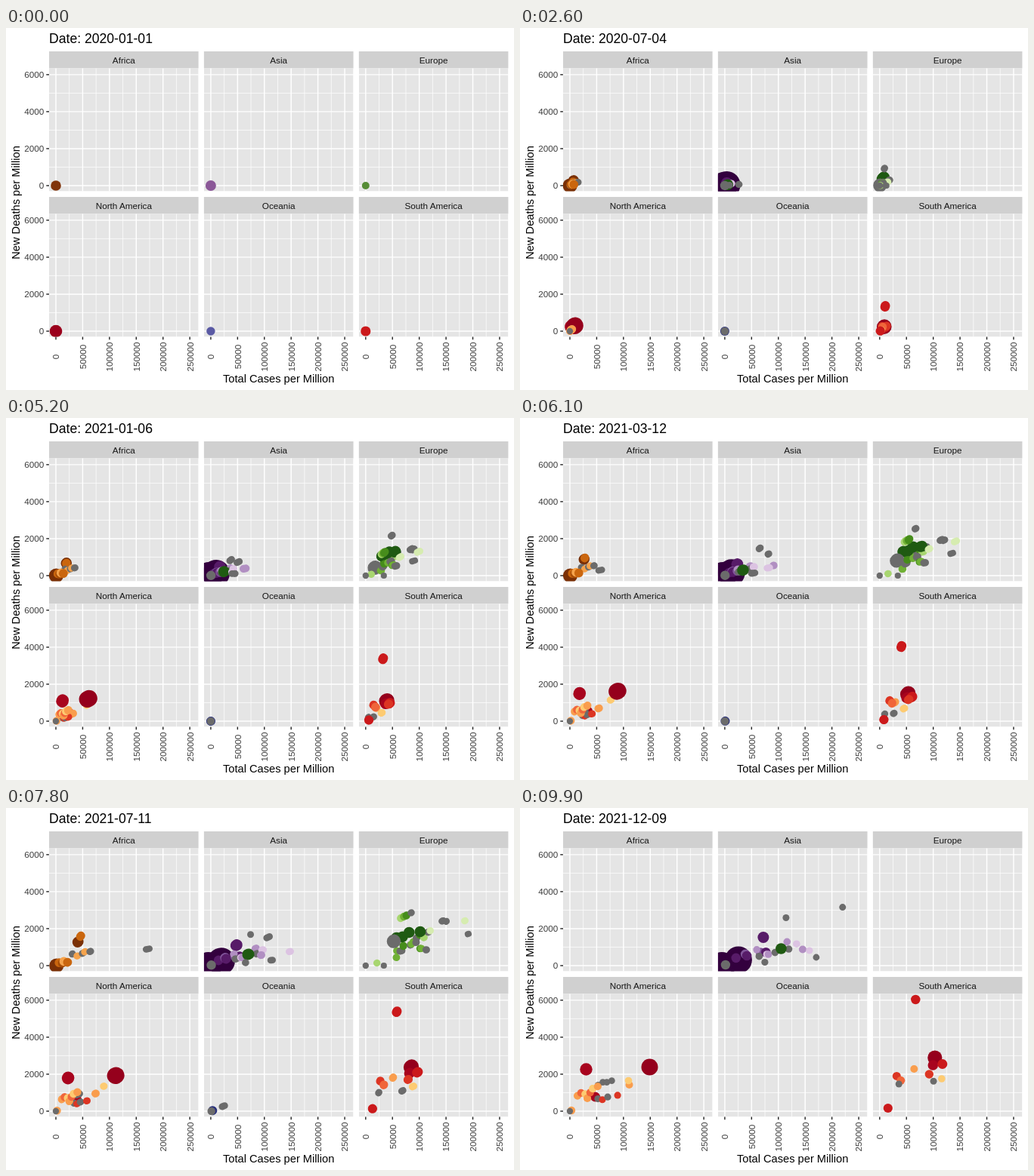
An HTML page for the animation above (10 s loop, 672 by 480 pixels).

```html
<!DOCTYPE html>
<html lang="en">
<head>
<meta charset="utf-8">
<title>Cases and deaths by continent</title>
<style>
html, body { margin: 0; width: 100%; height: 100%; overflow: hidden; background: #fff; }
svg { display: block; }
text { font: 11.73px "Liberation Sans", Arial, sans-serif; fill: #3d3d3d; }
.mid { text-anchor: middle; }
.end { text-anchor: end; }
.strip { fill: #161616; text-anchor: middle; }
.axis { font-size: 14.67px; fill: #000; text-anchor: middle; }
#date { font-size: 17.6px; fill: #000; }
.dot { stroke-linecap: round; fill: none; }
</style>
</head>
<body>
<svg id="stage" width="672" height="480">
  <text id="date" x="57" y="20"></text>
  <text class="axis" x="360.7" y="470">Total Cases per Million</text>
  <text class="axis" transform="translate(18 231.5) rotate(-90)">New Deaths per Million</text>
</svg>
<script>
const stage = document.getElementById('stage'), dateText = document.getElementById('date');
const W = 197.6, H = 163, XSTEP = 35.43, YSTEP = 49.05;
const KEYS = [0, 26, 43, 61, 70, 86, 99], LAST = 99;
const GREY = '#6b6b6b';
const panels = [];

function el(parent, tag, attrs, text) {
  const node = document.createElementNS('http://www.w3.org/2000/svg', tag);
  for (const key in attrs) node.setAttribute(key, attrs[key]);
  if (text !== undefined) node.textContent = text;
  return parent.appendChild(node);
}
const line = (parent, d, width, stroke) => el(parent, 'path', { d, stroke, 'stroke-width': width });

let seed = 7;
function random() {
  seed = (seed * 16807) % 2147483647;
  return seed / 2147483647;
}

// Growth from 0 to 1: a smooth wave between two ticks, two waves in a row, or a curve through KEYS.
const wave = (from, to) => k => {
  const u = Math.min(1, Math.max(0, (k - from) / (to - from)));
  return u * u * (3 - 2 * u);
};
const twoWaves = (share, a, b, c, d) => k => share * wave(a, b)(k) + (1 - share) * wave(c, d)(k);
const through = (...shares) => k => {
  let i = 1;
  while (k > KEYS[i] && i < shares.length - 1) i++;
  return shares[i - 1] + (shares[i] - shares[i - 1]) * (k - KEYS[i - 1]) / (KEYS[i] - KEYS[i - 1]);
};

// Each plot has its data origin at 0,0, with y upwards negated.
function panel(name, color, r, start, leaves, grow) {
  const col = panels.length % 3, row = Math.floor(panels.length / 3);
  const x = 57 + 204.9 * col, y = 53.5 + 193 * row;
  el(stage, 'rect', { x, y: y - 22.5, width: W, height: 22.5, fill: '#d0d0d0' });
  el(stage, 'text', { class: 'strip', x: x + W / 2, y: y - 6.5 }, name);
  const plot = el(stage, 'svg', { x, y, width: W, height: H, viewBox: `-9 -155.5 ${W} ${H}` });
  el(plot, 'rect', { x: -9, y: -155.5, width: W, height: H, fill: '#e5e5e5' });
  for (const [shift, width] of [[.5, .71], [0, 1.42]]) {
    for (let i = 0; i < 6; i++) line(plot, `M${(i + shift) * XSTEP} -156V8`, width, '#fff');
    for (let i = 0; i < 4; i++) line(plot, `M-9 ${-(i + shift) * YSTEP}H190`, width, '#fff');
  }
  if (!col) for (let i = 0; i < 4; i++) {
    const ty = y + 155.5 - i * YSTEP;
    line(stage, `M53.3 ${ty}H57`, 1.42, '#262626');
    el(stage, 'text', { class: 'end', x: 50.4, y: ty + 4.2 }, i * 2000);
  }
  if (row) for (let i = 0; i < 6; i++) {
    const tx = x + 9 + i * XSTEP;
    line(stage, `M${tx} 409.5V413.2`, 1.42, '#262626');
    el(stage, 'text', { class: 'mid', transform: `translate(${tx + 4.4} 436) rotate(-90)` }, i * 50000);
  }
  const p = { plot, start, leaves, grow, first: el(plot, 'circle', { r, fill: color }), dots: [] };
  panels.push(p);
  return p;
}

// A dot ends at x,y. Its pace is a growth function, or a power of the panel's own growth.
function dot(p, color, r, x, y, paceX = 1, paceY = paceX) {
  const share = (pace, k) => typeof pace === 'function' ? pace(k) : p.grow(k) ** pace;
  const at = k => `${(x * share(paceX, k)).toFixed(2)} ${(-y * share(paceY, k)).toFixed(2)}`;
  p.dots.push({ at, node: el(p.plot, 'path', { class: 'dot', stroke: color, 'stroke-width': 2 * r }) });
}

// n dots scattered along the diagonal of a box, cycling through the colours.
function crowd(p, n, colors, r, [x0, x1], [y0, y1], paceX, paceY) {
  for (let i = 0; i < n; i++) {
    const u = (i + random()) / n, v = (u + random()) / 2;
    dot(p, colors[i % colors.length], r, x0 + (x1 - x0) * u, y0 + (y1 - y0) * v, paceX, paceY);
  }
}

const [B0, B1, B2, B3] = ['#7a3006', '#a64c06', '#ca660e', '#f5a34c'];
const africa = panel('Africa', '#80340b', 6.8, 9, true, through(0, .12, .22, .47, .56, .9, 1));
dot(africa, B0, 9.5, 1, 0);
dot(africa, B0, 7, 40, 41, 1, .85);
dot(africa, GREY, 4.3, 166, 30, wave(45, 95));
dot(africa, B2, 5.5, 47, 56, 1.15);
crowd(africa, 5, [GREY, B3, GREY, B3], 4.6, [28, 60], [13, 28], .8);
crowd(africa, 4, [B2, B1, B3], 5.8, [2, 20], [1, 10], .6);

const [A0, A1, A2, A3, A4] = ['#33003e', '#571b68', '#81559a', '#b18fc2', '#dcc3e2'];
const [E0, E1, E2, E3, E4] = ['#1f5a12', '#468d1b', '#70b035', '#a8d670', '#d6ecb0'];
const asia = panel('Asia', '#8b5898', 7, 3, false, through(0, .05, .15, .32, .5, .83, 1));
dot(asia, A0, 18, -4, 0, .4);
dot(asia, A0, 18, 18, 7.5, .65);
dot(asia, A1, 7.5, 51, 37.5, 1, .8);
crowd(asia, 5, [A1, A2], 6.3, [8, 58], [5, 22], .9);
crowd(asia, 9, [A3, GREY, A4], 4.8, [36, 98], [4, 38], .8);
dot(asia, E0, 7.3, 74.5, 22.5);
dot(asia, A3, 5, 103, 21.5, twoWaves(.63, 35, 62, 75, 99));
dot(asia, A4, 4.6, 112, 20, wave(35, 86));
dot(asia, GREY, 4.5, 81, 63.5, twoWaves(.65, 36, 68, 84, 99));
dot(asia, GREY, 4.5, 157, 78, twoWaves(.38, 36, 64, 70, 101));
dot(asia, GREY, 4.4, 121, 11);
dot(asia, GREY, 4.6, 53, 4.5, .35);
dot(asia, GREY, 6.2, 1, 1);

const europe = panel('Europe', '#558c35', 5, 8, true, through(0, .05, .22, .65, .83, .92, 1));
crowd(europe, 10, [E2, GREY, E1, E3, GREY], 4.8, [45, 95], [16, 60], 1, .55);
crowd(europe, 4, [E0], 7.2, [36, 82], [26, 58], .9, .5);
crowd(europe, 3, [E3, E2, E1], 5, [50, 66], [70, 82], 1.1);
crowd(europe, 3, [GREY], 4.5, [108, 122], [55, 73], .75);
crowd(europe, 2, [E4], 4.6, [92, 148], [50, 78], .9);
dot(europe, GREY, 4.6, 67, 74, .8, .4);
dot(europe, GREY, 9, 46, 40, 1.6);
crowd(europe, 8, [E2, GREY, E1], 4.8, [42, 98], [8, 42], 1, .7);
dot(europe, E3, 4.7, 17, 4);
dot(europe, GREY, 4.1, 181, 56, twoWaves(.76, 25, 82, 85, 99));
dot(europe, GREY, 4.1, 24, 0, wave(10, 50));
dot(europe, GREY, 4.2, 0, 0);

const [R0, R1, R2, R3, R4, R5] = ['#95001c', '#a8041e', '#dc3523', '#f0653a', '#f99d4d', '#fdcb72'];
const north = panel('North America', '#9b001c', 8.3, 8, false, through(0, .06, .21, .6, .67, .83, 1));
dot(north, R1, 6.5, 33.5, 19, .7);
dot(north, R1, 8.2, 21.5, 55.5, 1, .8);
dot(north, R4, 5, 78.5, 35, 1.4);
dot(north, R5, 4.8, 77.5, 40.5, .7);
dot(north, R0, 11, 105.5, 58.5, 1, .75);
crowd(north, 4, [GREY], 4.4, [34, 56], [32, 46], 2);
crowd(north, 4, [GREY, R2], 4.6, [34, 66], [11, 22], 1.5);
crowd(north, 7, [R4, R3, R5], 5.1, [10, 38], [6, 38], .9);
dot(north, R4, 5.2, 2, 1);
dot(north, GREY, 4.2, 0, 0);

const oceania = panel('Oceania', '#5a5aa4', 5.7, 8, true, wave(50, 90));
dot(oceania, '#29307c', 6, 3, 1);
dot(oceania, GREY, 4.5, 40, 16, wave(70, 88));
dot(oceania, GREY, 5.2, 1, 0);

const S1 = '#cb191b';
const south = panel('South America', '#cb191b', 6.6, 8, false, through(0, .08, .25, .51, .7, .95, 1));
dot(south, S1, 6.2, 47.5, 148, .75, .6);
dot(south, R0, 9.6, 73, 71);
dot(south, R1, 6.8, 70.5, 61);
dot(south, S1, 6.5, 83, 62.5);
dot(south, R2, 5.7, 65.5, 49, .8);
dot(south, R4, 5, 45.5, 56, 1.2);
crowd(south, 2, [R2, R3], 5.5, [18, 36], [48, 38], .8);
dot(south, R5, 4.8, 82, 43, 1.4);
crowd(south, 2, [GREY], 4.5, [22, 74], [24, 56], 2);
dot(south, S1, 6.1, 11, 4);

const show = (node, on) => node.setAttribute('visibility', on ? 'visible' : 'hidden');

function draw(k) {
  const day = Math.floor(k * 708 / LAST);
  dateText.textContent = 'Date: ' + new Date(Date.UTC(2020, 0, 1 + day)).toISOString().slice(0, 10);
  for (const p of panels) {
    show(p.first, k < p.start);
    const live = k >= p.start && !(p.leaves && k === LAST);
    for (const { at, node } of p.dots) {
      show(node, live);
      // A short trail covers the neighbouring days that share one picture.
      const reach = k === LAST ? 0 : .5;
      if (live) node.setAttribute('d', `M${at(k - reach)}L${at(k + reach)}`);
    }
  }
}

const began = performance.now();
function tick() {
  draw(Math.floor((performance.now() - began) % 10000 / 100));
  requestAnimationFrame(tick);
}
tick();
</script>
</body>
</html>
```
